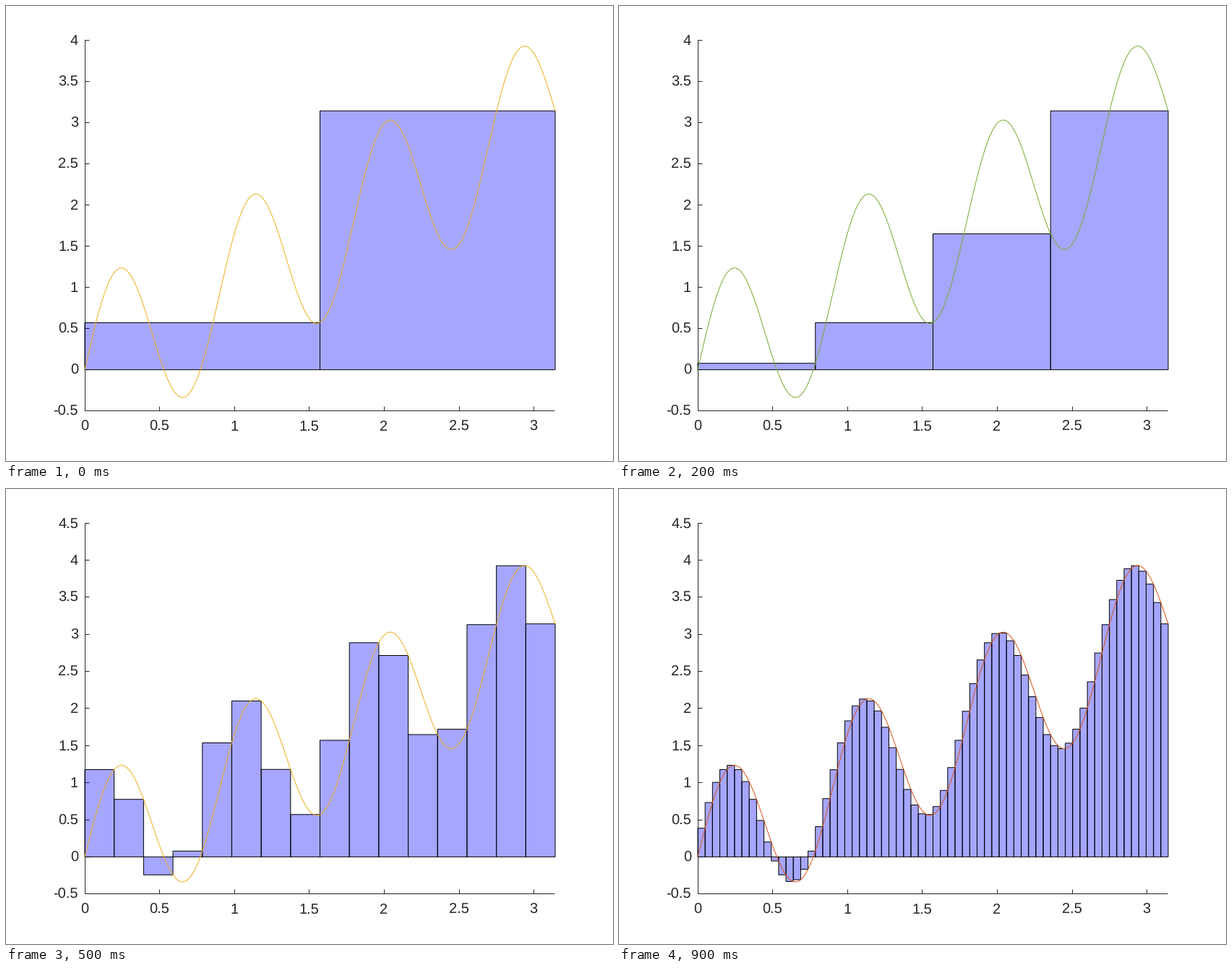
These frames come from a looping animation (840x630 px, 1100 ms). A matplotlib script:

```python
"""Right-endpoint Riemann sums of x + sin(7x) on [0, pi], doubling the bars."""
import numpy as np
import matplotlib.pyplot as plt
from matplotlib.animation import FuncAnimation
from matplotlib.patches import Rectangle

W, H, DPI = 840, 630, 100
PX = 72 / DPI                       # one pixel in points
LEFT, WIDTH = 109, 651
TOP, HEIGHT = 0.075 * H, 0.815 * H
BOTTOM = TOP + HEIGHT
TICK = 6
FRAMES = 11
INK = "#262626"
CURVE_COLORS = ["#0072bd", "#d95319", "#edb120", "#7e2f8e",
                "#77ac30", "#4dbeee", "#a2142f"]

plt.rcParams["font.family"] = "Liberation Sans"
plt.rcParams["text.hinting"] = "none"

fig = plt.figure(figsize=(W / DPI, H / DPI), dpi=DPI, facecolor="white")
ax = fig.add_axes([0, 0, 1, 1])


def f(x):
    return x + np.sin(7 * x)


def y_limits(heights, settled):
    """Limits hug the curve first and settle on round values a step later."""
    if heights.min() < 0:
        return -0.5, 4.5
    return (-0.5 if settled else -0.337), 4


def crisp(v):
    """Centre of the pixel that holds v."""
    return np.floor(v) + 0.5


def px(x):
    return LEFT + x / np.pi * WIDTH


def line(x0, y0, x1, y1):
    ax.plot([x0, x1], [y0, y1], color=INK, lw=PX, snap=False,
            solid_capstyle="projecting", zorder=1)


def label(x, y, value, align):
    ax.text(x, y, f"{value:g}", ha=align, va="baseline",
            fontsize=20 * PX, color=INK)


def draw_axes(py, low, high):
    x0, y0 = crisp(LEFT), crisp(BOTTOM)
    line(x0, crisp(TOP), x0, y0)
    line(x0, y0, LEFT + WIDTH - 1, y0)
    for v in np.arange(0, np.pi, 0.5):
        x = crisp(px(v))
        line(x, y0, x, y0 - TICK + 0.5)
        label(px(v) - 0.5, 588, v, "center")
    for v in np.arange(np.ceil(low * 2) / 2, high + 0.1, 0.5):
        v += 0.0                    # turns -0 into 0
        y = crisp(py(v))
        line(x0, y, x0 + TICK - 0.5, y)
        label(100, np.floor(py(v)) + 7, v, "right")


def draw(frame):
    # two steps per bar count, the first count gets only its second one
    n = 2 ** ((frame + 3) // 2)
    edges = np.linspace(0, np.pi, n + 1)
    heights = f(edges[1:])
    low, high = y_limits(heights, settled=frame % 2 == 0)

    def py(y):
        return TOP + (high - y) / (high - low) * HEIGHT

    ax.clear()
    ax.set_xlim(0, W)
    ax.set_ylim(H, 0)
    ax.axis("off")
    draw_axes(py, low, high)

    base = py(0)
    for x, h in zip(px(edges), heights):
        ax.add_patch(Rectangle((x, base), WIDTH / n, py(h) - base, lw=PX, snap=False,
                               fc=(0, 0, 1, 0.35), ec="black", zorder=2))

    x = np.linspace(0, np.pi, 400)
    ax.plot(px(x), py(f(x)), color=CURVE_COLORS[n % 7], lw=PX, snap=False, zorder=3)
    return []


anim = FuncAnimation(fig, draw, frames=FRAMES, init_func=lambda: [],
                     interval=100, repeat=True, repeat_delay=0)
plt.show()
```
